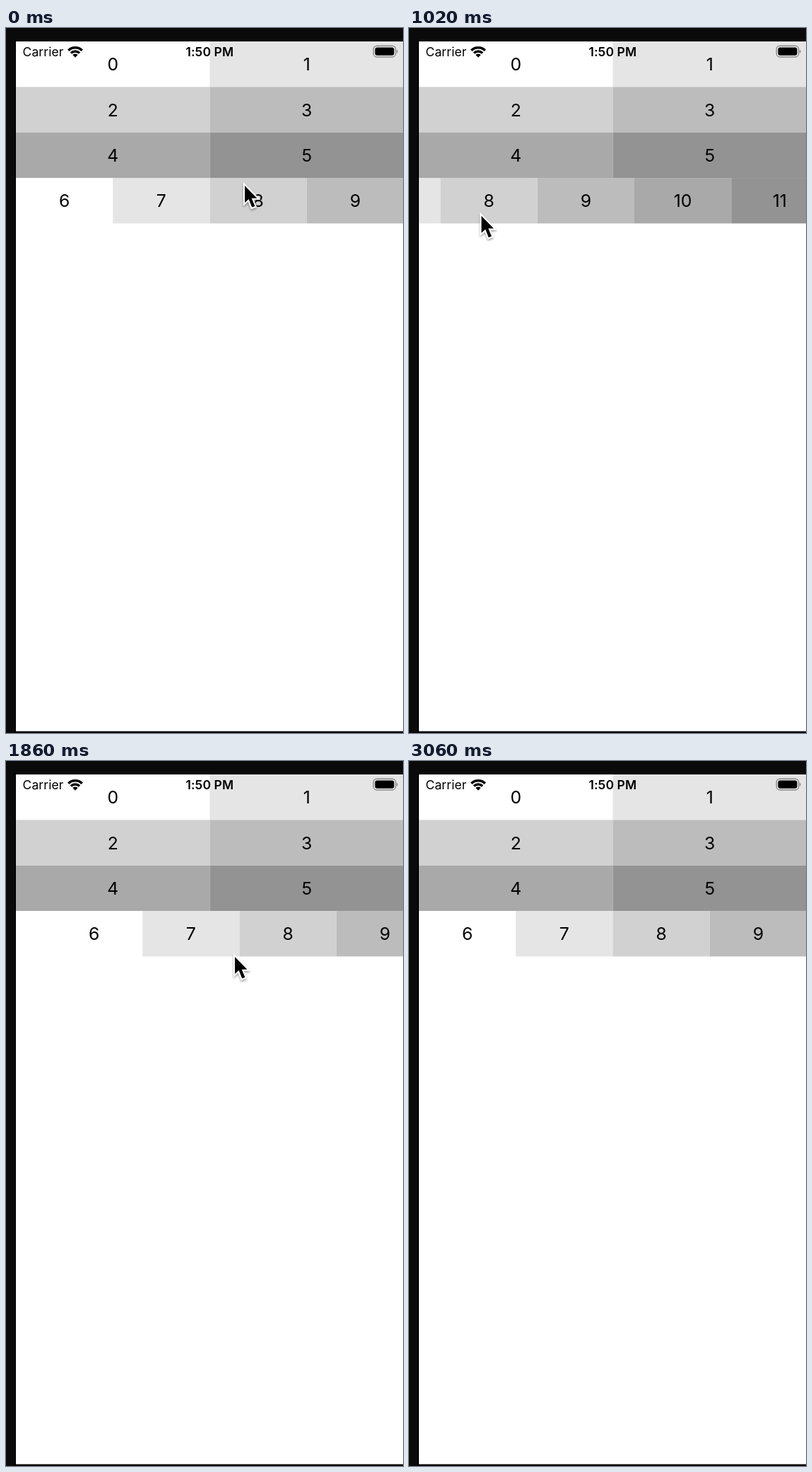
Write an HTML page that moves like this. It is 562 px wide and 997 px high and loops after 3120 ms.

```html
<!DOCTYPE html>
<html lang="en">
<head>
<meta charset="utf-8">
<title>Horizontal section scroll</title>
<style>
  html, body { margin: 0; width: 100%; height: 100%; overflow: hidden; background: #0a0a0a; }
  svg { display: block; width: 562px; height: 997px; }
  text { font-family: Inter, "Liberation Sans", sans-serif; fill: #000; }
  .number { font-size: 24.8px; text-anchor: middle; }
  .status { font-size: 17.5px; letter-spacing: .1px; }
</style>
</head>
<body>
<svg viewBox="0 0 562 997">
  <defs>
    <filter id="shadow" x="-50%" y="-50%" width="200%" height="200%">
      <feDropShadow dx="0" dy="2" stdDeviation="1.6" flood-color="#000" flood-opacity=".4"/>
    </filter>
    <clipPath id="screenClip"><rect x="14" y="19" width="548" height="975.5"/></clipPath>
  </defs>
  <rect width="562" height="997" fill="#0a0a0a"/>
  <rect x="12" y="17" width="550" height="980" fill="#000"/>
  <rect x="14" y="19" width="548" height="975.5" fill="#fff"/>
  <g clip-path="url(#screenClip)">
    <g id="grid"></g>
    <g id="strip"></g>
  </g>
  <text class="status" x="23.5" y="40">Carrier</text>
  <text class="status" x="288.3" y="40" text-anchor="middle" font-weight="600">1:50 PM</text>
  <g id="wifi" fill="none" stroke="#000" stroke-width="3.5"></g>
  <rect x="520.2" y="25.2" width="31.4" height="15.8" rx="4.8" fill="none" stroke="#000" stroke-opacity=".4" stroke-width="1.4"/>
  <rect x="522.4" y="27.4" width="27" height="11.4" rx="3" fill="#000"/>
  <path d="M553 30.5q3 2.6 0 5.4z" fill="#000" fill-opacity=".45"/>
  <g id="cursor" filter="url(#shadow)">
    <path d="M2 4V28L7.6 23 12.2 34.6 16.4 32.9 11.7 21.8H19.4z" fill="#000" stroke="#fff" stroke-width="4" paint-order="stroke"/>
  </g>
</svg>
<script>
const LOOP = 3120, STEP = 60, CURSOR_HIDDEN = 2580;
const LEFT = 14, TOP = 19, ROW = 64.35, WIDE = 274.5, NARROW = WIDE / 2;
const MAX_OFFSET = 2 * NARROW;
const SHADES = ["#ffffff", "#e5e5e5", "#d1d1d1", "#bcbcbc", "#a9a9a9", "#939393"];
const byId = id => document.getElementById(id);

function cell(n, x, y, width) {
  return `<rect x="${x}" y="${y}" width="${width}" height="${ROW}" fill="${SHADES[n % 6]}"/>
    <text class="number" x="${x + width / 2}" y="${y + 41.2}">${n}</text>`;
}

const six = [0, 1, 2, 3, 4, 5];
byId("grid").innerHTML = six.map(n =>
  cell(n, LEFT + (n % 2) * WIDE, TOP + Math.floor(n / 2) * ROW, WIDE)).join("");
byId("strip").innerHTML = six.map(n =>
  cell(n + 6, LEFT + n * NARROW, TOP + 3 * ROW, NARROW)).join("");

function fan(r) {
  const dx = r * Math.sin(0.77), y = 41.8 - r * Math.cos(0.77);
  return `M${98 - dx} ${y}A${r} ${r} 0 0 1 ${98 + dx} ${y}`;
}
byId("wifi").innerHTML = `<path d="${fan(14)}"/><path d="${fan(8.7)}"/>
  <path d="${fan(5.2)}L98 41.8z" fill="#000" stroke="none"/>`;

// Smooth curve through [time, value...] keys, at rest at both ends.
function follow(keys, t, k = 1) {
  const last = keys.length - 1;
  if (t <= keys[0][0]) return keys[0][k];
  if (t >= keys[last][0]) return keys[last][k];
  const i = keys.findIndex(key => key[0] > t) - 1;
  const a = keys[i], b = keys[i + 1], span = b[0] - a[0], u = (t - a[0]) / span;
  const slope = j => {
    if (j === 0 || j === last) return 0;
    const p = keys[j - 1], q = keys[j], n = keys[j + 1];
    const s1 = (q[k] - p[k]) / (q[0] - p[0]), s2 = (n[k] - q[k]) / (n[0] - q[0]);
    return s1 * s2 <= 0 ? 0 : 2 * s1 * s2 / (s1 + s2);
  };
  const u2 = u * u, u3 = u2 * u;
  return a[k] * (2 * u3 - 3 * u2 + 1) + b[k] * (3 * u2 - 2 * u3)
    + span * (slope(i) * (u3 - 2 * u2 + u) + slope(i + 1) * (u3 - u2));
}

// Overscroll after hitting the edge with a given speed, critically damped.
const bounce = (t, speed, rate) => speed * t * Math.exp(-rate * t);

const SWIPE_LEFT = [[640, 0], [780, 32], [900, 99.5], [980, 195], [1063, MAX_OFFSET]];
const SWIPE_RIGHT = [[1630, MAX_OFFSET + 1], [1680, 215], [1740, 60], [1772, 0]];

function scrollOffset(t) {
  if (t < 1063) return follow(SWIPE_LEFT, t);
  if (t < 1630) return MAX_OFFSET + bounce(t - 1063, 0.62, 0.0105);
  if (t < 1772) return follow(SWIPE_RIGHT, t);
  return t < 2600 ? -bounce(t - 1772, 1.257, 0.011) : 0;
}

const CURSOR = [
  [0, 336, 219], [240, 339, 231], [540, 345, 246], [640, 331, 248], [780, 298.5, 250],
  [900, 231, 254], [980, 135.5, 259], [1063, 73, 263.5], [1150, 45, 264], [1260, 94, 263],
  [1440, 133, 263], [1620, 136, 263], [1680, 182, 266], [1740, 272, 270], [1800, 314, 272],
  [1860, 322, 273], [2080, 328, 267], [2280, 331, 259], [2400, 343, 306], [2520, 364, 434]
];

function render(t) {
  byId("strip").setAttribute("transform", `translate(${-scrollOffset(t)} 0)`);
  const cursor = byId("cursor");
  cursor.setAttribute("visibility", t < CURSOR_HIDDEN ? "visible" : "hidden");
  cursor.setAttribute("transform", `translate(${follow(CURSOR, t, 1)} ${follow(CURSOR, t, 2)})`);
}

const start = performance.now();
function tick(now) {
  const t = Math.max(0, now - start) % LOOP;
  render(Math.floor(t / STEP) * STEP);
  requestAnimationFrame(tick);
}
render(0);
requestAnimationFrame(tick);
</script>
</body>
</html>
```
